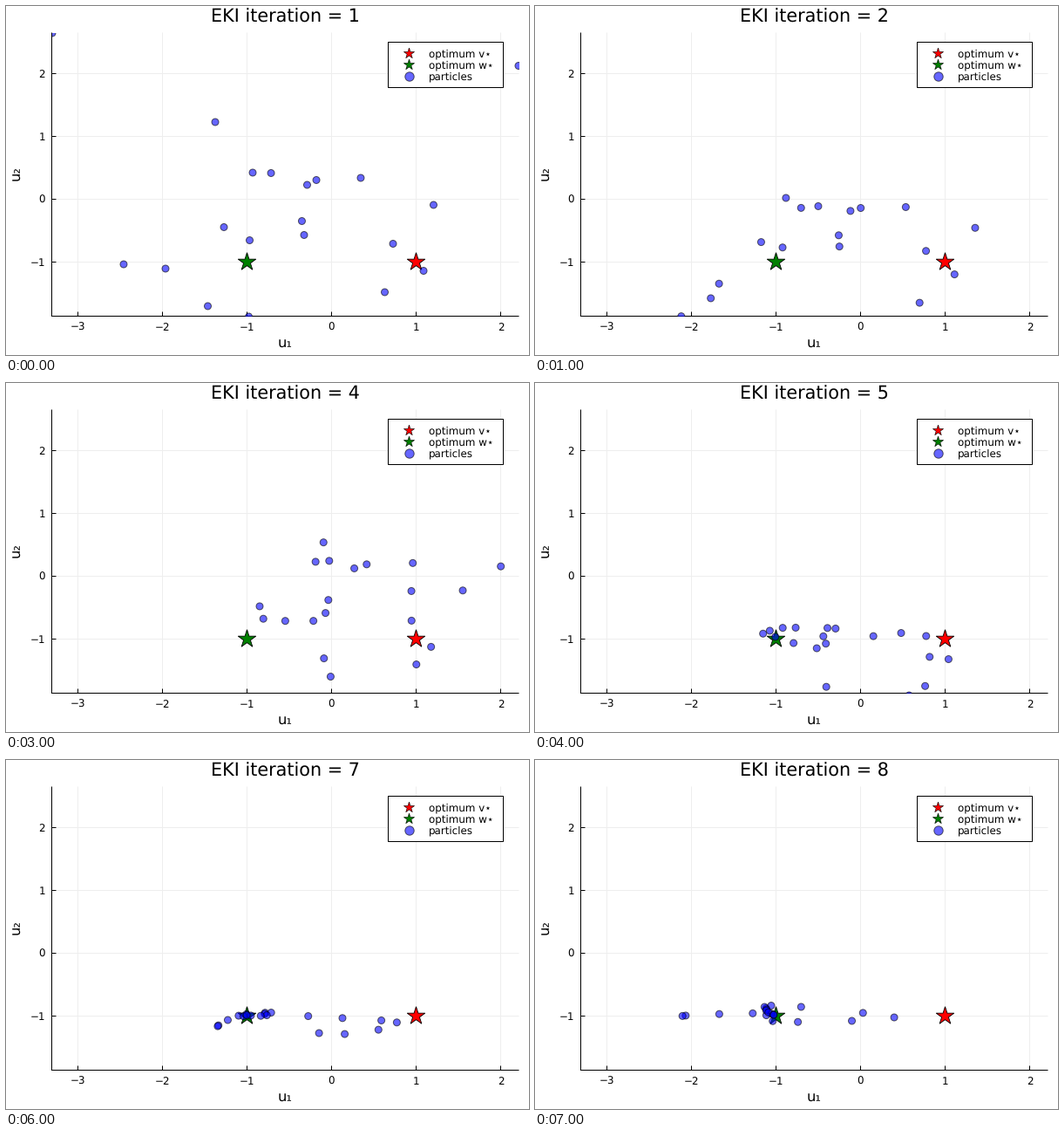
These frames come from a looping animation (600 px wide and 400 px high, 8 s). A matplotlib script:

```python
import numpy as np
import matplotlib.pyplot as plt
from matplotlib.animation import FuncAnimation
from matplotlib.collections import PatchCollection
from matplotlib.patches import Circle, Polygon, Rectangle

W, H = 600, 400
PX = 0.72                      # points per pixel at 100 dpi
LEFT, RIGHT, TOP, BOTTOM = 52.5, 588.5, 30.5, 355.5
OPT_V, OPT_W = np.array([1, -1]), np.array([-1, -1])

plt.rcParams["font.family"] = "DejaVu Sans"
plt.rcParams["text.hinting"] = "none"

# Initial ensemble, and the gain applied to the misfit at each iteration
start = np.array([
    (-1.376, 1.229), (-0.933, 0.424), (-0.716, 0.417), (-0.289, 0.229),
    (-0.180, 0.306), (0.345, 0.340), (1.206, -0.090), (-1.273, -0.444),
    (-0.969, -0.653), (-0.351, -0.347), (-0.325, -0.569), (0.727, -0.708),
    (2.211, 2.125), (1.088, -1.139), (0.629, -1.479), (-2.459, -1.035),
    (-1.964, -1.104), (-3.304, 2.646), (-1.464, -1.701), (-0.979, -1.868)])
gains = np.array([
    (0.067, -0.164), (-0.209, 0.017), (0.436, 0.168), (-0.290, -0.417),
    (-0.378, 0.614), (-0.041, -0.463), (-0.845, 0.181)])


def misfit(u):
    """Product of the distances to both optima, as a column."""
    return (np.linalg.norm(u - OPT_V, axis=1, keepdims=True)
            * np.linalg.norm(u - OPT_W, axis=1, keepdims=True))


clouds = [start]
for gain in gains:
    u = clouds[-1]
    clouds.append(u + gain * misfit(u))

fig = plt.figure(figsize=(W / 100, H / 100), dpi=100, facecolor="white")
ax = fig.add_axes([0, 0, 1, 1])
ax.set_xlim(0, W)
ax.set_ylim(H, 0)
ax.axis("off")


def px(u):
    return 373.5 + 97 * u


def py(u):
    return 221.5 - 72 * u


def line(x0, y0, x1, y1, color="black", z=2):
    ax.plot([x0, x1], [y0, y1], color=color, lw=PX, zorder=z, snap=False,
            solid_capstyle="butt")


def label(x, y, text, size, ha="center", **kw):
    return ax.text(x, y, text, fontsize=size * PX, ha=ha, va="baseline",
                   zorder=9, **kw)


def star(x, y, radius, color, z, edge):
    angle = np.pi / 5 * np.arange(10)
    r = np.where(np.arange(10) % 2, 0.382, 1) * radius
    points = np.column_stack([x + r * np.sin(angle), y - r * np.cos(angle)])
    ax.add_patch(Polygon(points, facecolor=color, edgecolor="black",
                         lw=edge * PX, joinstyle="miter", zorder=z))


def circles(points, radius):
    return [Circle(p, radius) for p in points]


def dots(points, radius, z):
    group = PatchCollection(circles(points, radius), facecolor="blue",
                            edgecolor="black", lw=PX, alpha=0.6, zorder=z)
    return ax.add_collection(group, autolim=False)


def number(n):
    return str(n).replace("-", "\u2212")


# Grid, ticks and axes
for n in range(-3, 3):
    x = px(n)
    line(x, TOP, x, BOTTOM, "#eeeeee", 1)
    line(x, BOTTOM, x, BOTTOM - 5)
    label(x, 372, number(n), 11.9)
for n in range(-1, 3):
    y = py(n)
    line(LEFT, y, RIGHT, y, "#eeeeee", 1)
    line(LEFT, y, LEFT + 5, y)
    label(45, y + 4.35, number(n), 11.9, ha="right")
line(LEFT, TOP, LEFT, BOTTOM + 0.5)
line(LEFT - 0.5, BOTTOM, RIGHT, BOTTOM)

label(320, 392, "u\u2081", 16.35)
label(16, 192, "u\u2082", 16.35, rotation=90, rotation_mode="anchor")
title = label(320, 18.3, "", 20.8)

# Optima and particles
star(px(1), py(-1), 10.8, "red", 3, 0.85)
star(px(-1), py(-1), 10.8, "green", 3, 0.85)
particles = dots([(0, 0)], 4, 4)
particles.set_clip_path(Rectangle((LEFT, TOP), RIGHT - LEFT, BOTTOM - TOP,
                                  transform=ax.transData))

# Legend
ax.add_patch(Rectangle((438.5, 41.5), 132, 52, facecolor="white",
                       edgecolor="black", lw=PX, zorder=6, snap=False))
star(462.5, 54.5, 6.4, "red", 7, 0.6)
star(462.5, 67.5, 6.4, "green", 7, 0.6)
dots([(462.5, 80.5)], 5.2, 7)
for i, text in enumerate(["optimum v\u22c6", "optimum w\u22c6", "particles"]):
    label(485, 58.8 + 13 * i, text, 11.9, ha="left")


def draw(i):
    title.set_text(f"EKI iteration = {i + 1}")
    u = clouds[i]
    points = np.column_stack([px(u[:, 0]), py(u[:, 1])])
    particles.set_paths(circles(points, 4))
    return title, particles


anim = FuncAnimation(fig, draw, frames=len(clouds), interval=1000,
                     repeat=True, repeat_delay=0)
plt.show()
```
